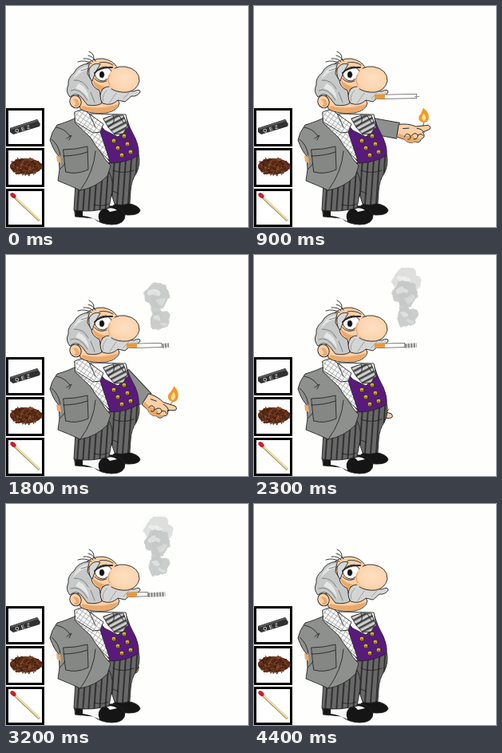
Animation, 303 px wide and 277 px high, one loop 4500 ms. Source, as an HTML page:

```html
<!DOCTYPE html>
<html lang="en">
<head>
<meta charset="utf-8">
<title>Gentleman smoking</title>
<style>
html, body { margin: 0; width: 100%; height: 100%; overflow: hidden; background: #fefefc; }
svg { display: block; width: 303px; height: 277px; }
.ink { stroke: #252525; stroke-width: .9; stroke-linejoin: round; stroke-linecap: round; }
.line { fill: none; }
.skin { fill: #fbd0a6; }
.shade { fill: #eba96c; stroke: none; }
</style>
</head>
<body>
<svg viewBox="0 0 303 277">
  <defs>
    <pattern id="pinstripe" width="7" height="40" patternUnits="userSpaceOnUse" patternTransform="rotate(4)">
      <path fill="#686868" d="M0 0h7v40h-7z"/><path fill="#303030" d="M1 0h2v40h-2z"/>
    </pattern>
    <pattern id="check" width="5" height="5" patternUnits="userSpaceOnUse" patternTransform="rotate(35)">
      <path fill="#fff" d="M0 0h5v5h-5z"/><path stroke="#999" stroke-width=".7" d="M0 .5h5M.5 0v5"/>
    </pattern>
    <pattern id="stripes" width="6" height="6" patternUnits="userSpaceOnUse" patternTransform="rotate(-28)">
      <path fill="#cfcfcf" d="M0 0h6v6h-6z"/><path fill="#444" d="M0 0h6v2.600h-6z"/>
    </pattern>
    <radialGradient id="noseTone" cx=".55" cy=".45" r=".65">
      <stop offset="0" stop-color="#fddfc2"/><stop offset=".7" stop-color="#fcd4ae"/><stop offset="1" stop-color="#f4bd8b"/>
    </radialGradient>
    <filter id="wisp" x="-30%" y="-30%" width="160%" height="160%">
      <feTurbulence type="fractalNoise" baseFrequency=".09" numOctaves="2" seed="4"/>
      <feDisplacementMap in="SourceGraphic" scale="9" xChannelSelector="R" yChannelSelector="G"/>
      <feGaussianBlur stdDeviation=".6"/>
    </filter>
  </defs>

  <g id="icons">
    <path fill="#fff" stroke="#000" stroke-width="3" d="M1.500 129.500h45v45h-45zM1.500 179.500h45v46h-45zM1.500 230.500h45v45h-45z"/>
    <path fill="#303030" d="M5 153L39 142L43 148L42 151L9 161L5 158Z"/>
    <path fill="#585858" d="M5 153L39 142L41 144L7 155Z"/>
    <text transform="translate(12 159) rotate(-17)" font-family="'Liberation Sans', sans-serif" font-size="6.500" font-weight="700" letter-spacing="3" fill="#c9c9c9">QEZ</text>
    <g id="tobacco" fill="none" stroke-width="1.300"></g>
    <path stroke="#8a7440" stroke-width="3" d="M10 239L42 269"/>
    <path stroke="#f3dfa8" stroke-width="2" d="M10 238.500L42 268.500"/>
    <ellipse cx="9" cy="237.500" rx="4" ry="2.800" transform="rotate(42 9 237.500)" fill="#c71e2b"/>
  </g>

  <g id="arm">
    <path id="sleeveEdge" stroke="#252525" stroke-width="21"/>
    <path id="sleeve" stroke="#8e908e" stroke-width="19.200"/>
    <g id="hand" class="ink">
      <path class="line" stroke="#7a5229" d="M28 -6L29 -18"/>
      <path class="skin" d="M-1 -8Q10 -12 20 -10L35 -15Q41 -13 36 -9L30 -5Q36 0 30 4Q30 10 23 9Q17 14 10 9L0 8Z"/>
      <path class="shade" d="M1 3Q10 6 19 2Q25 8 31 1Q29 9 23 9Q17 14 10 9L0 7Z"/>
      <path class="line" d="M9 6Q9 0 15 2Q19 7 14 8M17 3Q20 -4 25 0Q26 6 21 6M25 0Q29 -4 31 -1M22 -8Q28 -9 32 -5M5 -4L12 -6"/>
    </g>
  </g>
  <ellipse id="restingHand" class="ink" cx="162" cy="205" rx="4" ry="7" fill="#eba96c"/>

  <g id="body" class="ink">
    <path fill="#151515" d="M134 250Q142 244 152 247Q166 250 168 256Q167 262 153 262L134 260Z"/>
    <path fill="#151515" d="M86 256Q103 249 122 252Q143 247 149 262Q149 274 132 274Q117 273 110 266L87 264Z"/>
    <path fill="#f8f8f8" stroke="none" d="M96 257Q110 251 121 254Q113 260 117 270Q106 264 96 263ZM126 254Q134 252 139 256L130 258Z"/>
    <path fill="url(#pinstripe)" d="M90 198L132 196L166 186Q169 198 163 210Q157 218 156 232L155 247Q146 251 136 248L132 236L129 253Q108 259 85 256L87 222Z"/>
    <path class="line" d="M129 208Q136 220 132 238M134 206Q146 211 160 206M110 249Q121 252 128 248M134 232L141 235"/>
    <path fill="#5a1a7c" d="M112 140L150 138Q154 152 162 166Q167 178 166 187Q153 196 131 197Q118 182 112 140Z"/>
    <path fill="#fff" d="M106 135L150 136L153 152L140 164L124 156Z"/>
    <path fill="url(#stripes)" d="M122 141L134 137L147 137L152 150L147 160L136 161L128 152Z"/>
    <path class="line" d="M134 137Q139 146 128 152M142 138L147 146"/>
    <path fill="#8e908e" d="M92 138Q76 146 64 149Q57 158 55 168Q60 182 66 188L67 205L65 219Q78 224 93 231Q112 228 127 213L131 200Q117 186 108 160Z"/>
    <path class="shade" d="M63 187L68 189L69 197L64 195Z"/>
    <path class="line" d="M63 152Q74 154 80 163M57 167Q66 174 68 187M67 205Q75 199 77 188M112 182Q110 208 93 231M76 166L82 162L79 168"/>
    <path fill="#858785" d="M72 180Q87 180 102 176L103 205Q88 212 75 208Z"/>
    <path class="line" d="M72 188Q88 188 102 183"/>
    <path fill="url(#check)" d="M86 133Q97 127 104 135L122 148L118 158L130 194Q117 184 106 165L87 147Z"/>
    <path class="line" d="M88 146L109 159L118 158M104 135L112 152"/>
  </g>
  <g id="buttons" class="ink" fill="#dfae35"></g>

  <g id="head" class="ink">
    <path class="skin" d="M98 75Q108 65 122 66Q134 68 140 78L134 104L142 122Q140 131 126 134Q104 136 93 129L90 108Z"/>
    <path class="shade" d="M96 125Q114 131 140 123Q138 132 126 133Q105 135 94 129ZM108 92Q116 101 128 101L120 107Q110 103 108 92Z"/>
    <path fill="#c6c9c8" d="M104 72Q90 73 85 84Q77 90 78 99Q74 107 80 114Q88 107 95 115L102 124Q113 126 120 122L117 106Q107 101 107 93L102 85Z"/>
    <path fill="#e6e8e7" stroke="none" d="M101 75Q88 79 83 94Q90 83 102 80ZM87 103Q98 106 104 118Q103 103 91 97Z"/>
    <path class="line" stroke="#777" d="M81 106Q92 101 102 118M85 93Q97 92 103 104M94 81L104 78M106 108L111 121"/>
    <ellipse class="skin" cx="87" cy="120" rx="7" ry="8" transform="rotate(-25 87 120)"/>
    <path class="shade" d="M84 117Q90 114 92 123Q89 129 85 125Q90 122 84 117Z"/>
    <path class="line" d="M90 70Q99 67 107 72M103 62Q110 64 112 69M104 57Q111 60 110 67M97 66Q105 65 109 70"/>
    <path fill="#fff" d="M111 85Q115 76 126 76L132 81Q131 91 122 94Q113 94 111 85Z"/>
    <path fill="#d5d7d6" d="M104 79Q109 70 118 73L112 83L108 94Q103 90 104 79Z"/>
    <path class="line" stroke-width="2" d="M111 84Q117 76 133 77"/>
    <ellipse cx="120" cy="86" rx="2.700" ry="3.800" fill="#111"/>
    <path class="line" d="M111 91Q117 98 126 94M117 71Q127 69 134 74"/>
    <path fill="#d4d6d5" d="M121 104Q130 97 140 105L160 107Q168 103 168 108Q164 114 157 113L149 120L140 118Q132 126 121 122Q115 113 121 104Z"/>
    <path class="line" stroke="#999" d="M126 106Q119 113 122 119M138 109Q133 116 130 121M154 109L147 116"/>
    <path fill="url(#noseTone)" stroke="none" d="M129 85Q136 75 149 76Q167 79 167 94Q164 106 152 108Q138 110 129 101Q125 92 129 85Z"/>
    <path class="line" d="M136 78Q142 75 149 76Q167 79 167 94Q164 106 152 108Q140 109 132 104"/>
    <path class="line" stroke="#d39a66" d="M130 99Q126 92 130 86"/>
  </g>

  <g id="smoke" filter="url(#wisp)"></g>
  <g id="cigarette">
    <path id="outline" stroke="#555" stroke-width="6.200"/>
    <path id="paper" stroke="#fff" stroke-width="4.600"/>
    <path id="ash" stroke="#8c8c8c" stroke-width="5.600" stroke-dasharray="2.500 1"/>
    <path id="filterTip" stroke="#e9993c" stroke-width="5.600"/>
  </g>
  <g id="flame">
    <path fill="#f09a2c" d="M0 0C-9 -3 -7 -10 -3 -13L-1 -17L1 -21Q8 -14 7 -7Q6 0 0 0Z"/>
    <path fill="#ffe08a" d="M0 -2C-4 -5 -2 -9 1 -13Q6 -6 0 -2Z"/>
  </g>
</svg>

<script>
const LOOP = 4500, STEP = 100;
const $ = id => document.getElementById(id);
const set = (id, attrs) => Object.entries(attrs).forEach(([k, v]) => $(id).setAttribute(k, v));
const show = (id, visible) => set(id, { visibility: visible ? 'visible' : 'hidden' });
const mix = (a, b, k) => a + (b - a) * k;
const linear = (t, from, to) => Math.min(1, Math.max(0, (t - from) / (to - from)));
const smooth = (t, from, to) => { const k = linear(t, from, to); return k * k * (3 - 2 * k); };
const hump = (t, up, top, hold, down) => smooth(t, up, top) * (1 - smooth(t, hold, down));

const LIGHT_AT = 1100, GONE_AT = 4300;

function drawArm(t) {
  const reach = hump(t, 0, 300, 1800, 2500);
  const lift = .85 * hump(t, 0, 300, 300, 600) + hump(t, 600, 1100, 1300, 1800);
  const x = mix(175, 184, lift) - 50 * (1 - reach);
  const y = mix(181, 143, lift) + 12 * (1 - reach);
  const angle = mix(36, 0, lift);
  const d = `M146 150L${x} ${y}`;
  const visible = t >= 100 && t < 2700;
  show('arm', visible);
  set('sleeve', { d });
  set('sleeveEdge', { d });
  set('hand', { transform: `translate(${x} ${y}) rotate(${angle})` });
  show('restingHand', t >= 2500 && t < 4400);

  const turn = angle * Math.PI / 180, cos = Math.cos(turn), sin = Math.sin(turn);
  const flicker = Math.sin(t / 53);
  show('flame', t >= 500 && t < 2100);
  set('flame', {
    transform: `translate(${x + 29 * cos + 17 * sin} ${y + 29 * sin - 17 * cos}) rotate(${flicker * 6}) scale(.95 ${.93 + flicker * .06})`
  });
}

function drawCigarette(t) {
  const burnt = linear(t, LIGHT_AT, GONE_AT);
  const tip = 204 - 38 * burnt ** 5;
  const paperEnd = Math.min(tip, 204 - 40 * burnt);
  const segment = (from, to) => `M${from} 114L${to} 113`;
  const away = 1 - smooth(t, 0, 300);
  show('cigarette', t >= 100 && t < GONE_AT);
  set('cigarette', { transform: `translate(${-15 * away} ${80 * away})` });
  set('outline', { d: segment(151, paperEnd) });
  set('paper', { d: segment(151, paperEnd - .6) });
  set('ash', { d: segment(paperEnd, tip) });
  set('filterTip', { d: segment(151, Math.min(164, paperEnd)) });
}

// Puffs leave the tip at even intervals, swell, slow down and thin out.
function puffAt(t, born) {
  const age = (t - born) / 2000;
  const rise = 1 - (1 - age) ** 3;
  const size = (9 + 9 * rise) * Math.min(1, age * 12);
  return {
    x: 190 + 9 * (1 - rise) ** 4 + Math.sin(t / 170 + born) * 1.2,
    y: 108 - 79 * rise,
    size,
    alpha: .9 * (1 - linear(age, .45, .85)) * (1 - smooth(t, 3700, GONE_AT))
  };
}

function drawSmoke(t) {
  const puffs = [];
  for (let born = LIGHT_AT; born < Math.min(t, 3900); born += 450) {
    const puff = puffAt(t, born);
    if (puff.alpha > 0) puffs.push(puff);
  }
  $('smoke').innerHTML = puffs.map(({ x, y, size, alpha }, i) => {
    const next = puffs[i + 1];
    const neck = next ? `<path d="M${x} ${y}Q${x - 5} ${(y + next.y) / 2} ${next.x} ${next.y}" fill="none" stroke="#c6c8c8" stroke-width="12" opacity="${alpha}"/>` : '';
    return `${neck}<g transform="translate(${x} ${y}) scale(${size})" opacity="${alpha}">
      <circle r="1" fill="#c6c8c8"/>
      <ellipse cx="-.25" cy="-.25" rx=".45" ry=".3" fill="#dfe1e1"/>
      <ellipse cx=".35" cy=".4" rx=".4" ry=".25" fill="#d5d7d7"/></g>`;
  }).join('');
}

function seeded(seed) {
  return () => (seed = seed * 16807 % 2147483647) / 2147483647;
}

function buildDetails() {
  const rnd = seeded(71), browns = ['#3d1c10', '#643019', '#7d4526', '#54270f', '#8a5230'];
  const spread = size => (rnd() - .5) * size;
  let shreds = '<ellipse cx="25" cy="201" rx="20" ry="10" fill="#56291a"/>';
  for (let i = 0; i < 220; i++) {
    const a = rnd() * Math.PI * 2, r = Math.sqrt(rnd());
    shreds += `<path stroke="${browns[i % browns.length]}" d="M${25 + Math.cos(a) * r * 20} ${201 + Math.sin(a) * r * 11}q${spread(4)} ${spread(4)} ${spread(6)} ${spread(4)}"/>`;
  }
  $('tobacco').innerHTML = shreds;

  const button = (x, y) => `<circle cx="${x}" cy="${y}" r="3"/><path d="M${x - 1} ${y + 1}h2"/>`;
  let row = '';
  for (let i = 0; i < 3; i++) row += button(135 + i * 5, 169 + i * 9) + button(148 + i * 4, 163 + i * 10);
  $('buttons').innerHTML = row;
}

function frame() {
  const t = Math.floor((performance.now() % LOOP) / STEP) * STEP;
  drawArm(t);
  drawCigarette(t);
  drawSmoke(t);
  requestAnimationFrame(frame);
}

buildDetails();
frame();
</script>
</body>
</html>
```
